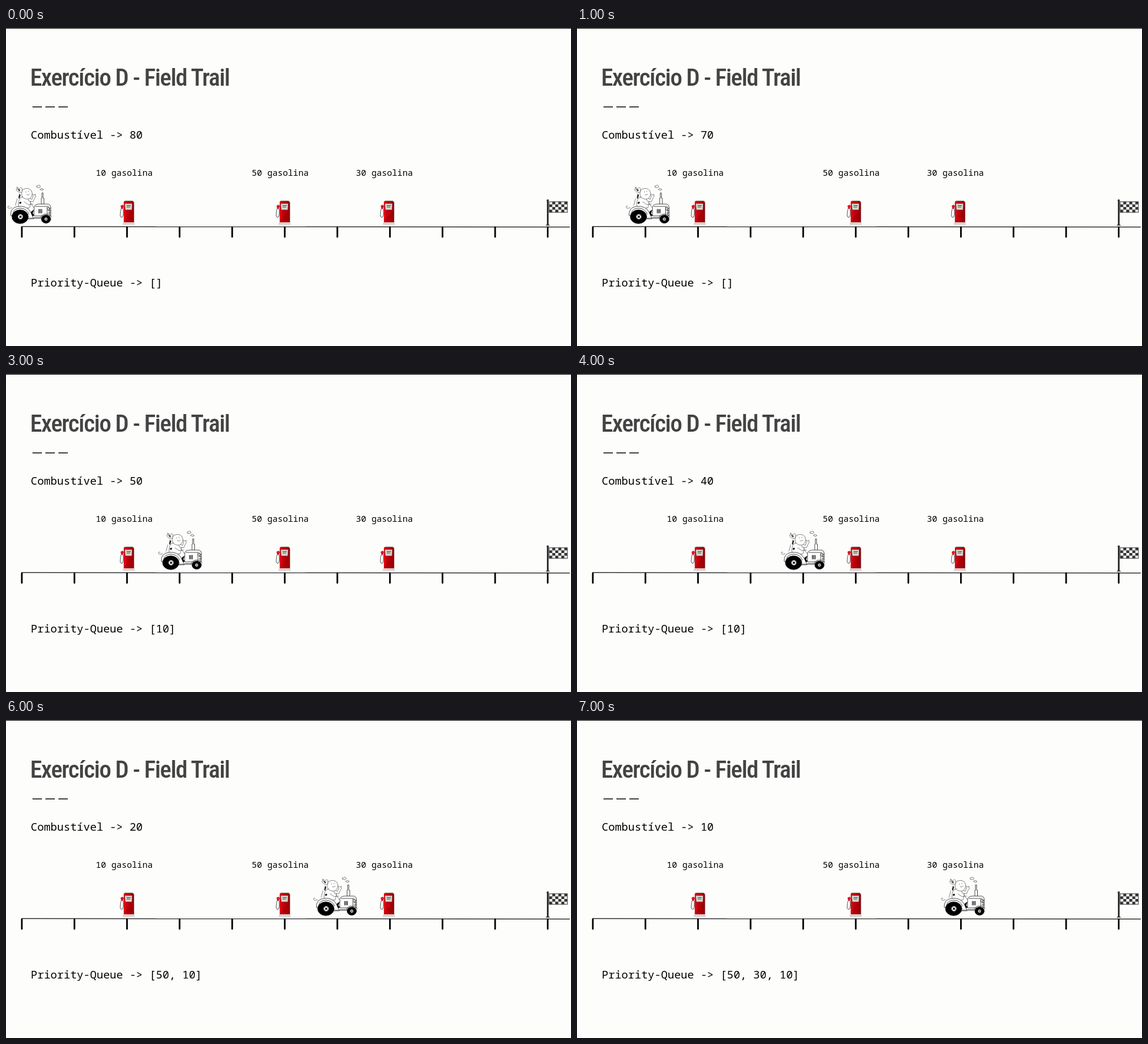
Write an HTML page that moves like this. It is 960 by 540 pixels and loops after 8 s.

```html
<!DOCTYPE html>
<html lang="pt">
<head>
<meta charset="utf-8">
<style>
  html, body { margin: 0; width: 100%; height: 100%; overflow: hidden; background: #fdfefc; }
  svg { display: block; width: 960px; height: 540px; }
  text { font-family: "Noto Sans Mono", monospace; font-size: 18.67px; white-space: pre; }
  .title { font: 500 41px "Roboto Condensed", Roboto, sans-serif; font-stretch: 75%; letter-spacing: -1.4px; fill: #434343; }
  .label { font-size: 14.67px; }
  #tractor { fill: #fff; stroke: #222; stroke-width: .8; stroke-linecap: round; stroke-linejoin: round; }
  #tractor .ink { fill: #000; }
  #tractor .line { fill: none; }
  #tractor .cow { stroke: #444; stroke-width: .65; }
</style>
</head>
<body>
<svg viewBox="0 0 960 540">
  <defs>
    <linearGradient id="red">
      <stop offset="0" stop-color="#e0101c"/>
      <stop offset=".3" stop-color="#c8000c"/>
      <stop offset="1" stop-color="#980008"/>
    </linearGradient>
    <g id="pump">
      <path d="M3 14Q1 18 1 27Q2 31 5 29Q7 26 6 15Z" fill="#fff" stroke="#555"/>
      <path d="M1.500 10 5 8 7 10 6 15H3Z" fill="#d81420"/>
      <path d="M7 4Q7 1.500 9 1.500H22Q24 1.500 24 4V38H7Z" fill="url(#red)"/>
      <path d="M9 1.500H22" stroke="#999"/>
      <path d="M8.500 6H21.500L21 17H9.500Z" fill="#d9d4cc" stroke="#6b2020" stroke-width=".7"/>
      <path d="M12 9.500H19M12 12H18" stroke="#444"/>
      <path d="M24 4V38" stroke="#600"/>
      <path d="M8 35 20 20H23V38H8Z" fill="#900" opacity=".35"/>
      <path d="M6 38.500H25L26 42H5Z" fill="#d0d0d0"/>
    </g>
    <pattern id="checks" x="923" y="295" width="10.270" height="9" patternUnits="userSpaceOnUse">
      <rect width="10.270" height="9" fill="#fff"/>
      <path d="M5.130 0H10.270V4.500H0V9H5.130Z" fill="#333"/>
    </pattern>
  </defs>

  <path d="M0 .5H960" stroke="#000"/>
  <text class="title" x="41" y="98">Exercício D - Field Trail</text>
  <path d="M45 134H61M67 134H83M89 134H105" stroke="#434343" stroke-width="2"/>
  <text id="fuel" x="42" y="188"></text>
  <text id="queue" x="42" y="439"></text>
  <g id="stations"></g>

  <path d="M26 337.200 958 338" stroke="#333" stroke-width="1.500"/>
  <path id="ticks" stroke="#000" stroke-width="2.800" stroke-linecap="round"/>

  <rect x="923" y="295" width="30.800" height="18" fill="url(#checks)" stroke="#333"/>
  <path d="M920.500 293V335" stroke="#333" stroke-width="3"/>
  <circle cx="920.500" cy="293" r="2" fill="#333"/>
  <path d="M916.500 335.500Q920.500 331 924.500 335.500Z" fill="#333"/>

  <g id="tractor">
    <!-- smoke -->
    <path d="M52 270Q51 267 54 268Q56 265 58 268Q59 271 56 271ZM58 274Q60 271 62 273Q65 274 63 275Q60 277 58 274Z" stroke-width=".6"/>
    <g class="cow">
      <path class="line" d="M10 305Q4 308 3 304Q3 301 6 303"/>
      <path d="M22 306Q19 294 25 288L31 286Q42 288 42 297L40 305Z"/>
      <path d="M37 288 44 291 46 285Q43 282 46 282L48 284 50 282 50 285Q52 286 49 288L46 295 39 294Z"/>
      <path d="M28 287Q24 279 29 274Q38 270 43 276Q47 284 40 290Q33 292 28 287Z"/>
      <path class="line" d="M35 283Q38 285 40 282M34 278V279M38 277V278"/>
      <path d="M27 279Q21 280 18 276Q16 272 20 273L18 270Q22 271 22 274Q25 269 27 272Z"/>
      <path class="ink" d="M20 274 24 275 23 277ZM23 282 24.500 284 22.500 290 21.500 288ZM23 296Q26 294 26 297Q25 299 23 298Z"/>
      <path class="line" d="M31 295 38 300 46 299M41 296 47 305M19 290 16 301"/>
    </g>
    <!-- exhaust and bonnet -->
    <path d="M60 299V289H61V280H63V289H64.500V299Z"/>
    <path d="M48 303Q50 299 56 299H72Q76 300 76 305V319H48Z"/>
    <path class="line" d="M50 303H70V319M71 302Q75 304 74 318M48 322H62M72 306H76M72 310H76M72 314H76"/>
    <path d="M56 308V314M58.300 308V314M60.600 308V314" stroke-width="1.400"/>
    <circle cx="72" cy="307" r="2"/>
    <path class="ink" d="M43 312 47 309 45 315 48 318 41 321Z"/>
    <!-- fender -->
    <path d="M8 318Q7 305 20 303Q36 301 42 313L47 324H36Z"/>
    <path class="line" d="M12 314Q14 306 24 306Q35 306 39 316M38 323H62"/>
    <!-- wheels -->
    <ellipse class="ink" cx="24" cy="320.500" rx="14" ry="11.700"/>
    <circle cx="24.500" cy="320.500" r="4.500"/>
    <circle class="ink" cx="24.500" cy="320.500" r="1.500"/>
    <path class="line" d="M21 317 28 324M28 317 21 324"/>
    <ellipse class="ink" cx="68" cy="324.500" rx="8" ry="7"/>
    <circle cx="68" cy="324.500" r="2.800"/>
    <circle class="ink" cx="68" cy="324.500" r=".8"/>
    <path class="line" d="M59 321Q62 315 70 316Q76 317 77 321"/>
  </g>
</svg>
<script>
  const byId = id => document.getElementById(id);
  const stations = [
    { stop: 2, x: 193, labelX: 152.5, gas: 10 },
    { stop: 5, x: 458, labelX: 417.5, gas: 50 },
    { stop: 7, x: 635, labelX: 594.5, gas: 30 },
  ];
  const shifts = [0, 80.5, 168.5, 256, 344, 431.5, 519.5, 616];

  byId('ticks').setAttribute('d',
    Array.from({ length: 11 }, (_, i) => `M${26.9 + 89.35 * i} 338.5V354.7`).join(''));
  byId('stations').innerHTML = stations.map(s =>
    `<text class="label" x="${s.labelX}" y="251">${s.gas} gasolina</text>
     <use href="#pump" x="${s.x}" y="292"/>`).join('');
  const pumps = document.querySelectorAll('#stations use');

  let shown = -1;
  function draw() {
    const step = Math.floor(performance.now() / 1000) % 8;
    if (step !== shown) {
      shown = step;
      const queue = stations.filter(s => s.stop <= step).map(s => s.gas).sort((a, b) => b - a);
      byId('fuel').textContent = `Combustível -> ${80 - 10 * step}`;
      byId('queue').textContent = `Priority-Queue -> [${queue.join(', ')}]`;
      byId('tractor').setAttribute('transform', `translate(${shifts[step]})`);
      // The pump gives way to the tractor that stops there.
      pumps.forEach((p, i) => p.style.display = stations[i].stop === step ? 'none' : '');
    }
    requestAnimationFrame(draw);
  }
  draw();
</script>
</body>
</html>
```
